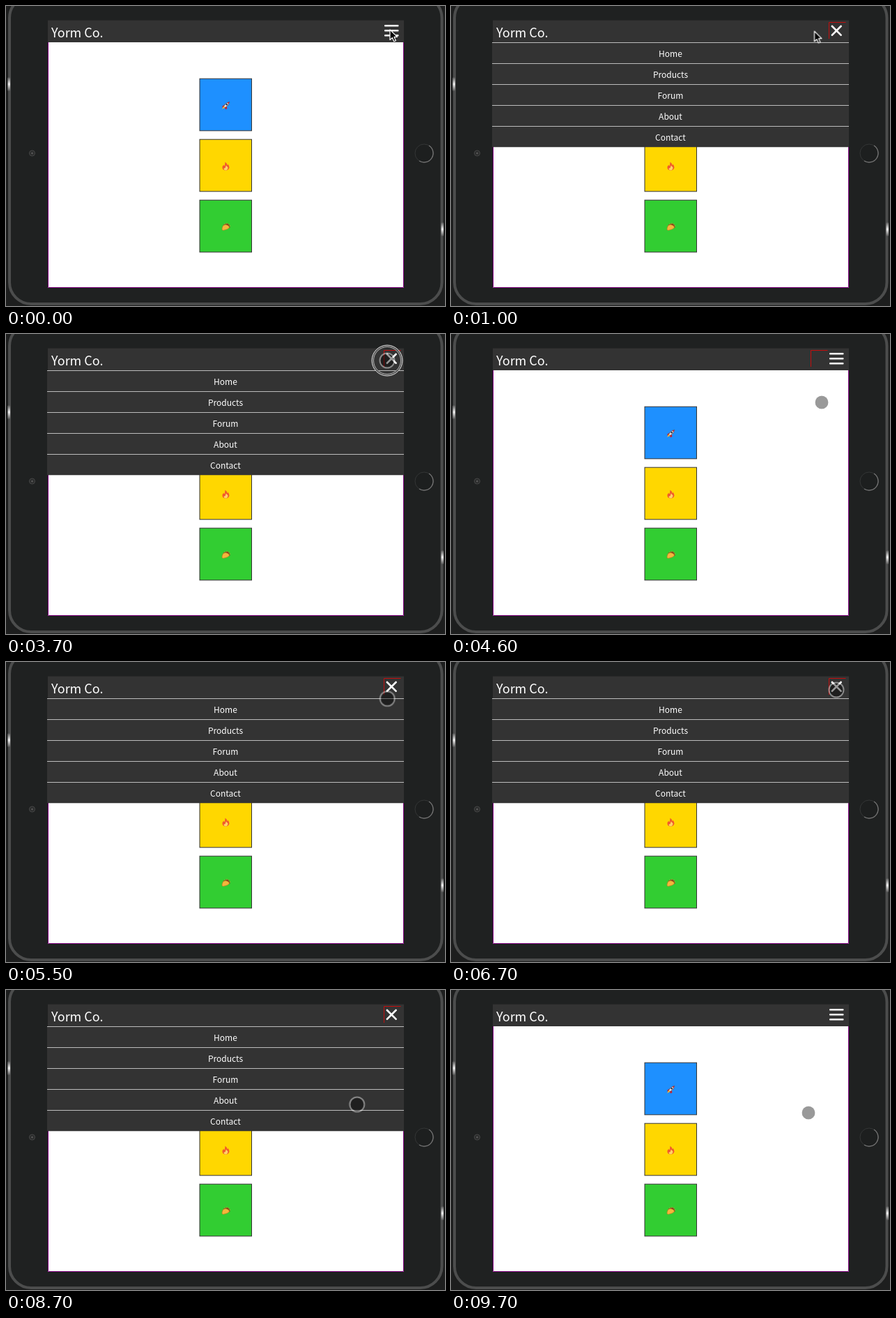
Animation of 630 by 430 pixels, one loop 9800 ms. Source, as an HTML page:

```html
<!DOCTYPE html>
<html lang="en">
<head>
<meta charset="utf-8">
<title>Menu demo</title>
<style>
@property --open { syntax: "<number>"; inherits: true; initial-value: 0; }

html, body { margin: 0; width: 100%; height: 100%; overflow: hidden; background: #1d1e1e; }
svg { display: block; animation: open 9.8s linear infinite; }
text { font-family: "Noto Sans CJK SC", "Noto Sans CJK JP", "Noto Sans", sans-serif; fill: #fff; }
.brand { font-size: 18px; }
.items { font-size: 12px; font-weight: 500; text-anchor: middle; }

.menu { clip-path: inset(0 0 calc((1 - var(--open)) * 100%) 0); }
.bar { transform-box: fill-box; transform-origin: center; }
.top { transform: translateY(calc(var(--open) * 7px)) rotate(calc(var(--open) * 45deg)); }
.mid { opacity: calc(1 - var(--open)); }
.low { transform: translateY(calc(var(--open) * -7px)) rotate(calc(var(--open) * -45deg)); }

.focus { transform: translateX(calc(var(--open) * 26px)); animation: focus 9.8s step-end infinite; }
.arrow { animation: arrow 9.8s linear infinite, arrow-show 9.8s step-end infinite; }
.touch { animation: touch 9.8s ease-in-out infinite, touch-show 9.8s step-end infinite; }
.ripple { animation: ripple 9.8s linear infinite; }

@keyframes open {
  0%, .9%, 41.84%, 53.06%, 72.45%, 82.65%, 97.96%, 100% { --open: 0; }
  3.06%, 38.78%, 56.12%, 69.39%, 85.71%, 94.9% { --open: 1; }
}
@keyframes focus {
  0%, 94.9%, 100% { opacity: 0; }
  1.02% { opacity: 1; }
}
@keyframes arrow {
  0%, 5.1% { transform: translate(551px, 34px); }
  14.29% { transform: translate(498px, 38px); }
  16.33% { transform: translate(485px, 40px); }
  20.41%, 100% { transform: translate(449px, 238px); }
}
@keyframes arrow-show {
  0% { opacity: 1; }
  22.45%, 100% { opacity: 0; }
}
@keyframes touch {
  0%, 22.45% { transform: translate(463px, 248px); }
  25.51%, 27.55% { transform: translate(471px, 249px); }
  35.71%, 39.8% { transform: translate(547px, 38px); }
  46.94%, 47.5% { transform: translate(532px, 98px); }
  52.04%, 55.1% { transform: translate(553px, 40px); }
  60.2% { transform: translate(485px, 190px); }
  67.35%, 70.41% { transform: translate(553px, 40px); }
  75.51% { transform: translate(500px, 140px); }
  81.63%, 84.69% { transform: translate(556px, 46px); }
  92.86%, 95.9% { transform: translate(452px, 281px); }
  98.98%, 100% { transform: translate(513px, 176px); }
}
@keyframes touch-show {
  0% { opacity: 0; }
  22.45%, 100% { opacity: 1; }
}
@keyframes ripple {
  0%, 37.3%, 39.8%, 52.6%, 55.1%, 68.9%, 71.4%, 82.2%, 84.7%, 94.5%, 96.9%, 100% { opacity: 0; }
  37.4%, 38.7%, 52.7%, 54%, 69%, 70.3%, 82.3%, 83.6%, 94.6%, 95.9% { opacity: 1; }
}
</style>
</head>
<body>
<svg width="630" height="430" viewBox="0 0 630 430">
  <defs>
    <linearGradient id="shine" x2="0" y2="1">
      <stop offset="0" stop-color="#555"/>
      <stop offset=".5" stop-color="#eee"/>
      <stop offset="1" stop-color="#555"/>
    </linearGradient>
  </defs>

  <!-- tablet -->
  <rect width="630" height="430" fill="#1d1e1e"/>
  <rect x="5" y="-14" width="620.5" height="441" rx="31" fill="#1f2121" stroke="#4c4d4d" stroke-width="4"/>
  <rect x="2.5" y="102" width="3.5" height="20" rx="1.5" fill="url(#shine)"/>
  <rect x="624.5" y="310" width="3.5" height="20" rx="1.5" fill="url(#shine)"/>
  <circle cx="37.5" cy="211" r="4" fill="#292a2a" stroke="#484949"/>
  <circle cx="37.5" cy="211" r="1.5" fill="#555"/>
  <circle cx="600" cy="211" r="13" fill="#1d1f1f" stroke="#343636"/>
  <path d="M607 200a13 13 0 0 1-14 22" fill="none" stroke="#777" stroke-width="1.3"/>

  <!-- page -->
  <path d="M60 52H571V404H60Z" fill="#fff"/>
  <path d="M60.5 52V403.5H570.5V52" fill="none" stroke="#800080"/>
  <g stroke="#333" stroke-width="1">
    <rect x="278" y="104.2" width="74.5" height="74.6" fill="#1e90ff"/>
    <rect x="278" y="191.2" width="74.5" height="74.6" fill="#ffd700"/>
    <rect x="278" y="278.2" width="74.5" height="74.6" fill="#32cd32"/>
  </g>
  <g transform="translate(315.5 142.5)">
    <path d="M-2-1L-5 1-5 3-1 2ZM1 1L2 4 0 6-2 3Z" fill="#c8202c"/>
    <path d="M5-5Q1-5-3 1L-1 3Q5 0 5-5Z" fill="#e4e4e8" stroke="#40303c" stroke-width=".7"/>
    <path d="M5-5L2-4 4-2Z" fill="#c8202c"/>
    <circle cx="1.3" cy="-1.3" r="1.2" fill="#234"/>
    <path d="M-3 1L-5.5 5.5-1 3Z" fill="#ffb52b"/>
  </g>
  <g transform="translate(315.5 229.5)">
    <path d="M-1-6Q2-4 2-1Q3-2 3-3Q5 0 5 2Q4 6 0 6Q-5 6-5 2Q-5 0-3-2Q-3 0-2 0Q-1-3-1-6Z" fill="#f0582c"/>
    <path d="M0-1Q3 1 3 3Q2 6 0 6Q-3 6-3 3Q-2 3-1.5 3Q0 2 0-1Z" fill="#ffd36a"/>
  </g>
  <g transform="translate(315.5 316.5)">
    <path d="M-5 2Q-5-5 2-5Q6-4 6 1L4 2-3 4Z" fill="#8a3b1c"/>
    <path d="M-4-1Q-2-5 2-5Q6-4 6 0" fill="none" stroke="#79b52f" stroke-width="1.5" stroke-dasharray="2 1"/>
    <path d="M-5.5 3Q-5-3 0-3Q5-2 5 1Q3 4-4 5Q-5.5 5-5.5 3Z" fill="#f5b63c" stroke="#b9781c" stroke-width=".6"/>
  </g>

  <!-- navigation -->
  <g class="menu">
    <rect x="59" y="52" width="512" height="150.5" fill="#333"/>
    <path d="M59 52.5H571M59 82.5H571M59 112.5H571M59 142.5H571M59 172.5H571" stroke="#bcbcbc"/>
    <g class="items">
      <text x="315" y="73.3">Home</text>
      <text x="315" y="103.3">Products</text>
      <text x="315" y="133.3">Forum</text>
      <text x="315" y="163.3">About</text>
      <text x="315" y="193.3">Contact</text>
    </g>
  </g>
  <rect x="60" y="20.5" width="511" height="31.5" fill="#333"/>
  <text class="brand" x="65" y="44.5">Yorm Co.</text>
  <path class="focus" d="M516.5 47V23.5H540.5" fill="none" stroke="#c40d0d"/>
  <g fill="#fff">
    <rect class="bar top" x="543" y="27" width="20.5" height="2.6" rx="1"/>
    <rect class="bar mid" x="543" y="34" width="20.5" height="2.6" rx="1"/>
    <rect class="bar low" x="543" y="41" width="20.5" height="2.6" rx="1"/>
  </g>

  <!-- pointers -->
  <path class="arrow" d="M0 0V14.5L3.4 11.4 5.8 16.8 8.4 15.7 6 10.4H10.4Z" fill="#000" stroke="#fff" stroke-width="1.2" stroke-linejoin="round"/>
  <g class="touch">
    <circle r="9.5" fill="#000" fill-opacity=".4"/>
    <circle r="10.5" fill="none" stroke="#fff" stroke-opacity=".42" stroke-width="2"/>
    <g class="ripple" fill="none">
      <circle r="20.5" stroke="#555" stroke-width="3"/>
      <circle r="19.5" stroke="#aaa" stroke-width="1"/>
      <circle r="22" stroke="#ddd" stroke-width="1"/>
    </g>
  </g>
</svg>
</body>
</html>
```
